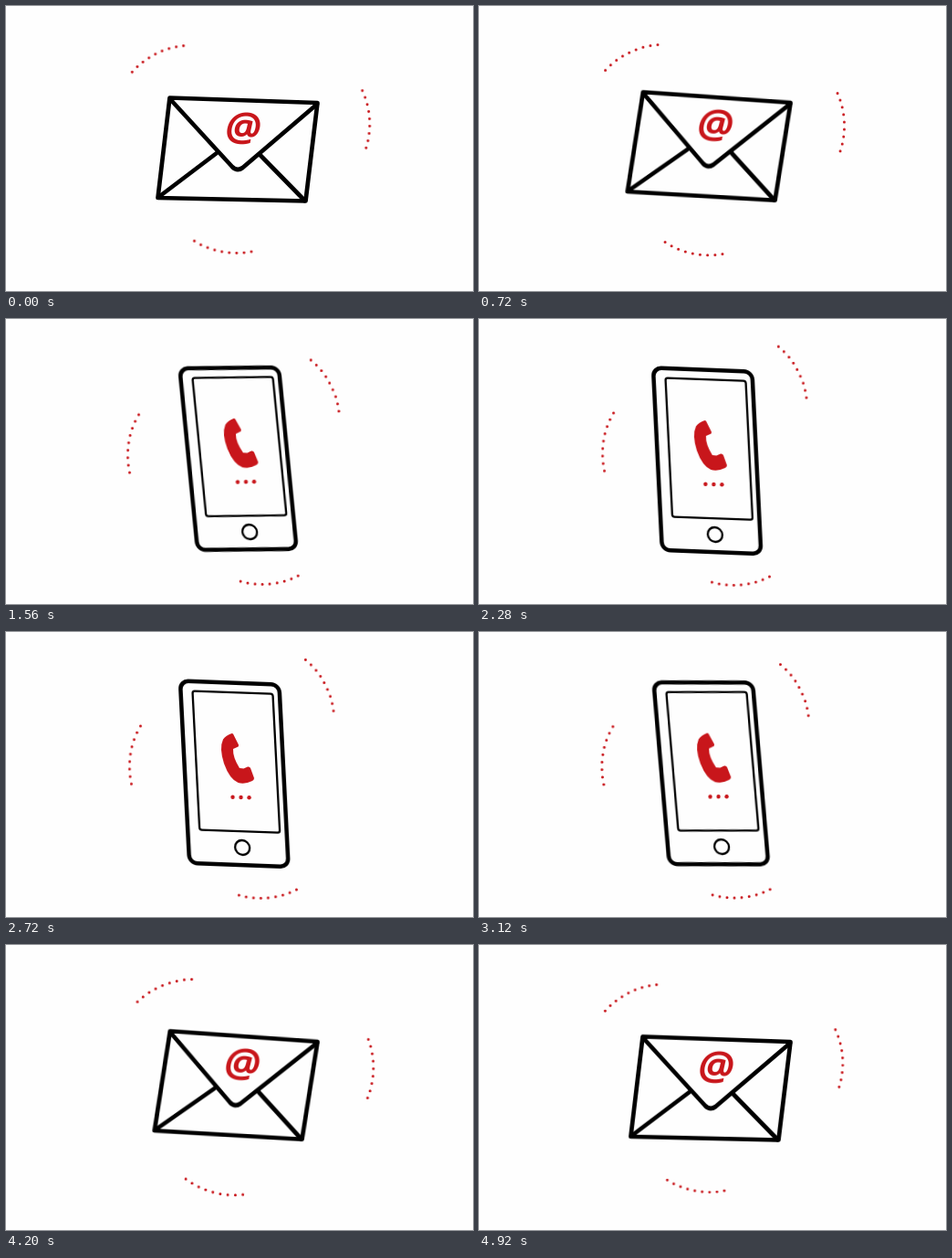
An HTML page without scripts for the animation above (4.96 s loop, 512x312 px).

```html
<!DOCTYPE html>
<html lang="en">
<head>
<meta charset="utf-8">
<title>Mail and call</title>
<style>
  :root {
    --red: #c8161b;
    --sine: cubic-bezier(.37, 0, .63, 1);
    --late: cubic-bezier(.75, 0, .75, .9);
  }
  html, body {
    margin: 0;
    width: 100%;
    height: 100%;
    overflow: hidden;
    background: #fefefe;
  }
  svg {
    position: absolute;
    left: 0;
    top: 0;
    width: 512px;
    height: 312px;
    fill: none;
    stroke-linecap: round;
    stroke-linejoin: round;
  }

  /* Everything plays forward for half the loop, then backward. */
  .card, .sway, .ring, .arc {
    animation: 2480ms linear infinite alternate;
  }

  .card {
    stroke: #000;
    transform-origin: 254px 156px;
    backface-visibility: hidden;
  }
  .card .red { fill: var(--red); stroke: none; }
  .at { font: 700 44px "Open Sans", sans-serif; text-anchor: middle; }

  .mail { animation-name: turn-away; }
  .phone { animation-name: turn-in; }
  @keyframes turn-away {
    0%, 30.65% { transform: perspective(1000px) rotateY(0deg); animation-timing-function: var(--late); }
    58.06%, 100% { transform: perspective(1000px) rotateY(-180deg); }
  }
  @keyframes turn-in {
    0%, 30.65% { transform: perspective(1000px) rotateY(180deg); animation-timing-function: var(--late); }
    58.06%, 100% { transform: perspective(1000px) rotateY(0deg); }
  }

  .mail .sway { transform-origin: 254px 157.5px; animation-name: sway-mail; }
  @keyframes sway-mail {
    0% { transform: translate(0, 0) rotate(0deg); animation-timing-function: var(--sine); }
    29.03%, 100% { transform: translate(-1.8px, -3.5px) rotate(2.15deg); }
  }

  .phone .sway { transform-origin: 250.5px 155px; animation-name: sway-phone; }
  @keyframes sway-phone {
    0%, 56.45% {
      transform: translate(4.3px, -2.7px) rotate(-2.9deg);
      animation-timing-function: cubic-bezier(.47, 0, .745, .715);
    }
    74.2% {
      transform: translate(4.1px, -.5px) rotate(-2.1deg);
      animation-timing-function: cubic-bezier(.39, .575, .565, 1);
    }
    100% { transform: translate(-.6px, .1px) rotate(.25deg); }
  }

  .ring {
    stroke: var(--red);
    stroke-width: 3;
    stroke-dasharray: 0 1;
  }
  .ring, .grow { transform-origin: 256px 150px; }
  .ring { animation-name: spin; }
  .grow { animation: swell 2480ms linear infinite alternate; }
  @keyframes spin {
    0% { transform: translateY(-1px) rotate(-1deg); animation-timing-function: var(--sine); }
    29.03% { transform: translateY(0) rotate(0deg); animation-timing-function: var(--late); }
    56.45%, 100% { transform: translateY(0) rotate(87.3deg); }
  }
  @keyframes swell {
    0% { transform: scale(.99); animation-timing-function: var(--sine); }
    29.03% { transform: scale(1); }
    38.7% { transform: scale(1.06); }
    46.8% { transform: scale(1.075); }
    53.2% { transform: scale(1.05); }
    58.06%, 100% { transform: scale(1); }
  }

  .a { animation-name: slide-a; }
  .b { animation-name: slide-b; }
  .c { animation-name: slide-c; }
  @keyframes slide-a {
    0%, 29.03% { transform: translate(0, 0); }
    53.2% { transform: translate(24px, -7px); }
    56.45% { transform: translate(19.8px, -4.9px); animation-timing-function: var(--sine); }
    100% { transform: translate(.9px, 1.7px); }
  }
  @keyframes slide-b {
    0%, 29.03% { transform: translate(0, 0); }
    56.45% { transform: translate(-3.1px, -3.9px); animation-timing-function: var(--sine); }
    100% { transform: translate(-2px, -1.7px); }
  }
  @keyframes slide-c {
    0%, 29.03% { transform: translate(0, 0); }
    56.45% { transform: translate(1.9px, .1px); animation-timing-function: var(--sine); }
    100% { transform: translate(-.3px, -2.5px); }
  }
</style>
</head>
<body>

<svg viewBox="0 0 512 312">
  <g class="ring">
    <g class="grow">
      <path class="arc a" pathLength="8.02" d="M138.500 70.500A88 88 0 0 1 196 42.500"/>
      <path class="arc b" pathLength="8.02" d="M393 95.500A88 88 0 0 1 396 159"/>
      <path class="arc c" pathLength="8.02" d="M267 271.500A88 88 0 0 1 204 258.500"/>
    </g>
  </g>
</svg>

<svg class="card mail" viewBox="0 0 512 312">
  <g class="sway" stroke-width="4.7">
    <path d="M179.500 100.500L341.500 106L328.500 213.500L166.500 210Z"/>
    <path d="M180 102L248 176Q253.500 181.500 259.500 177L341 107.500"/>
    <path d="M167.500 209L231 161M327.500 213L278.500 163"/>
    <text class="at red" transform="translate(258 148) rotate(3) skewX(-7)">@</text>
  </g>
</svg>

<svg class="card phone" viewBox="0 0 512 312">
  <g class="sway">
    <g transform="matrix(1 .037 .05 1 191 53.5)" stroke-width="2.3">
      <rect width="108.5" height="199.5" rx="9" stroke-width="4.5"/>
      <rect x="13" y="10.500" width="88" height="152" rx="2.5"/>
      <circle cx="59" cy="180.300" r="8"/>
    </g>
    <path class="red" d="M249 111.500L255 123.500Q255.500 125.500 253.500 126L249 128Q248.500 137 256 149L260.500 149.500L265 147.500Q267 147 268 149L272 160Q272 162 270 163Q262 167 254.500 165Q245 161 239 144Q233.500 127 238 117.500Q241 113 247.500 111Q248.500 111 249 111.500Z"/>
    <g class="red">
      <circle cx="248.500" cy="180.700" r="2.2"/>
      <circle cx="257.500" cy="181" r="2.2"/>
      <circle cx="266.500" cy="181.300" r="2.2"/>
    </g>
  </g>
</svg>

</body>
</html>
```
